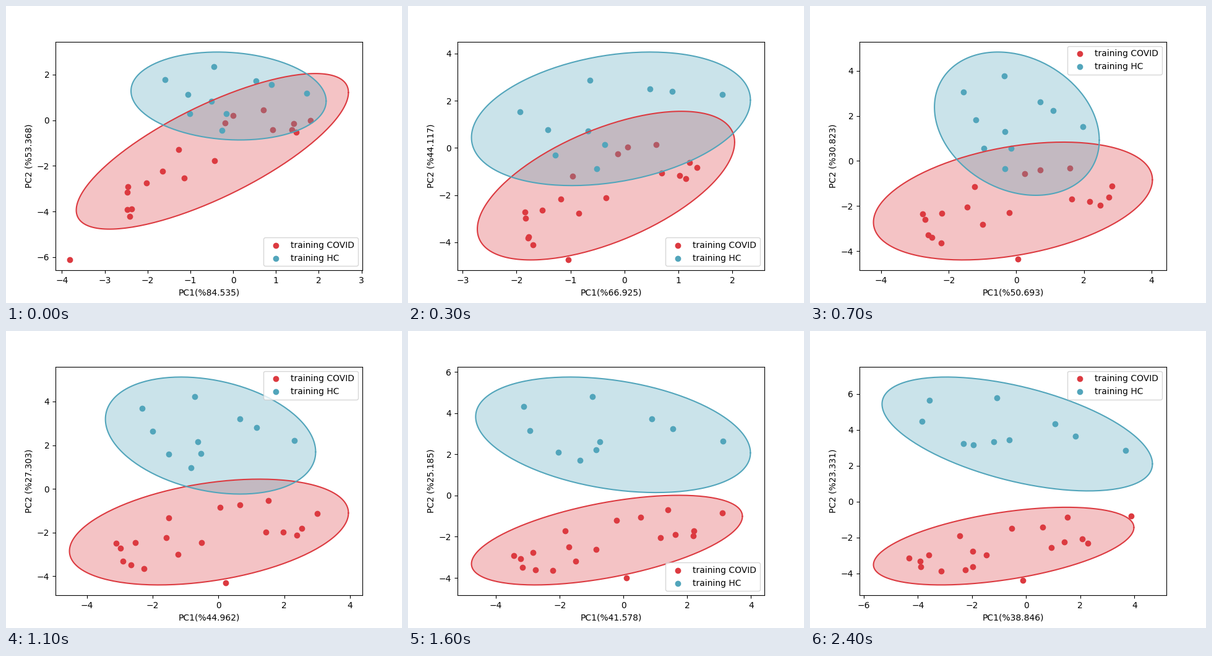
A matplotlib script for the animation above (2.5 s loop, 640 by 480 pixels).

```python
import matplotlib.pyplot as plt
import numpy as np
from matplotlib.animation import FuncAnimation

FRAMES, INTERVAL = 25, 100
RED, BLUE = "#dc3a40", "#52a5bb"
THETA = np.linspace(0, 2 * np.pi, 201)

# Key poses; each ellipse is centre x, y, half width, half height, correlation.
STEPS = [0, 3, 7, 11, 16, 20, 24]
COVID = [(-0.485, -1.365, 3.18, 3.41, 0.756),
         (-0.342, -1.598, 2.385, 3.15, 0.585),
         (-0.10, -1.777, 4.13, 2.615, 0.36),
         (-0.29, -1.975, 4.24, 2.42, 0.36),
         (-0.52, -2.165, 4.25, 2.177, 0.53),
         (-0.73, -2.24, 4.39, 1.98, 0.195),
         (-0.83, -2.48, 4.81, 2.163, 0.48)]
HC = [(-0.106, 1.06, 2.28, 1.927, -0.115),
      (-0.25, 1.234, 2.586, 2.83, 0.28),
      (0.016, 1.657, 2.44, 3.18, -0.23),
      (-0.242, 2.44, 3.195, 2.677, -0.28),
      (-0.328, 2.95, 4.31, 2.805, -0.313),
      (-0.167, 3.337, 4.47, 3.036, -0.41),
      (-0.329, 3.766, 4.994, 3.172, -0.525)]
PC1 = [84.535, 66.925, 50.693, 44.962, 41.578, 38.489, 38.846]
PC2 = [53.368, 44.117, 30.823, 27.303, 25.185, 23.400, 23.331]

rng = np.random.default_rng(4)


def make_cloud(n):
    """Random dots in the unit disc, each with its own drift."""
    r, a = 0.72 * np.sqrt(rng.random(n)), 2 * np.pi * rng.random(n)
    return np.array([r * np.cos(a), r * np.sin(a)]), rng.normal(0, 0.15, (2, n))


covid_cloud, hc_cloud = make_cloud(17), make_cloud(5)


def place(cloud, pins, t):
    start, drift = cloud
    return np.hstack([start + drift * (t - 0.5), np.transpose(pins)])


def covid_dots(i):
    t, fade = i / (FRAMES - 1), np.exp(-i / 3)
    outlier = 0.15 - 1.2 * fade, -1.08 + 0.16 * fade
    rightmost = 0.6 + 0.38 * t, -0.15 + 0.5 * t
    return place(covid_cloud, [outlier, rightmost], t)


def hc_dots(i):
    pins = [(-0.65, 0.3), (-0.15, 0.65), (0.8, 0.15), (0.28, 0.38), (-0.4, -0.45)]
    return place(hc_cloud, pins, i / (FRAMES - 1))


def pose(keys, i):
    return [np.interp(i, STEPS, track) for track in np.transpose(keys)]


def to_data(unit, cx, cy, hx, hy, rho):
    """Map unit-disc points into the tilted ellipse."""
    u, v = unit
    return cx + hx * u, cy + hy * (rho * u + np.sqrt(1 - rho**2) * v)


def draw_group(keys, dots, color, label, i):
    shape = pose(keys, i)
    x, y = to_data((np.cos(THETA), np.sin(THETA)), *shape)
    ax.fill(x, y, color=color, alpha=0.3, lw=0)
    ax.plot(x, y, color=color, lw=1.5, solid_capstyle="round")
    ax.scatter(*to_data(dots(i), *shape), color=color, label=label)


def update(i):
    ax.clear()
    draw_group(COVID, covid_dots, RED, "training COVID", i)
    draw_group(HC, hc_dots, BLUE, "training HC", i)
    ax.set_xlabel(f"PC1(%{np.interp(i, STEPS, PC1):.3f})")
    ax.set_ylabel(f"PC2 (%{np.interp(i, STEPS, PC2):.3f})")
    low = i < 7 or 14 <= i < 19
    ax.legend(loc="lower right" if low else "upper right")


fig, ax = plt.subplots(figsize=(6.4, 4.8), dpi=100)
anim = FuncAnimation(fig, update, frames=FRAMES, init_func=lambda: None,
                     interval=INTERVAL, repeat=True, repeat_delay=0)
plt.show()
```
